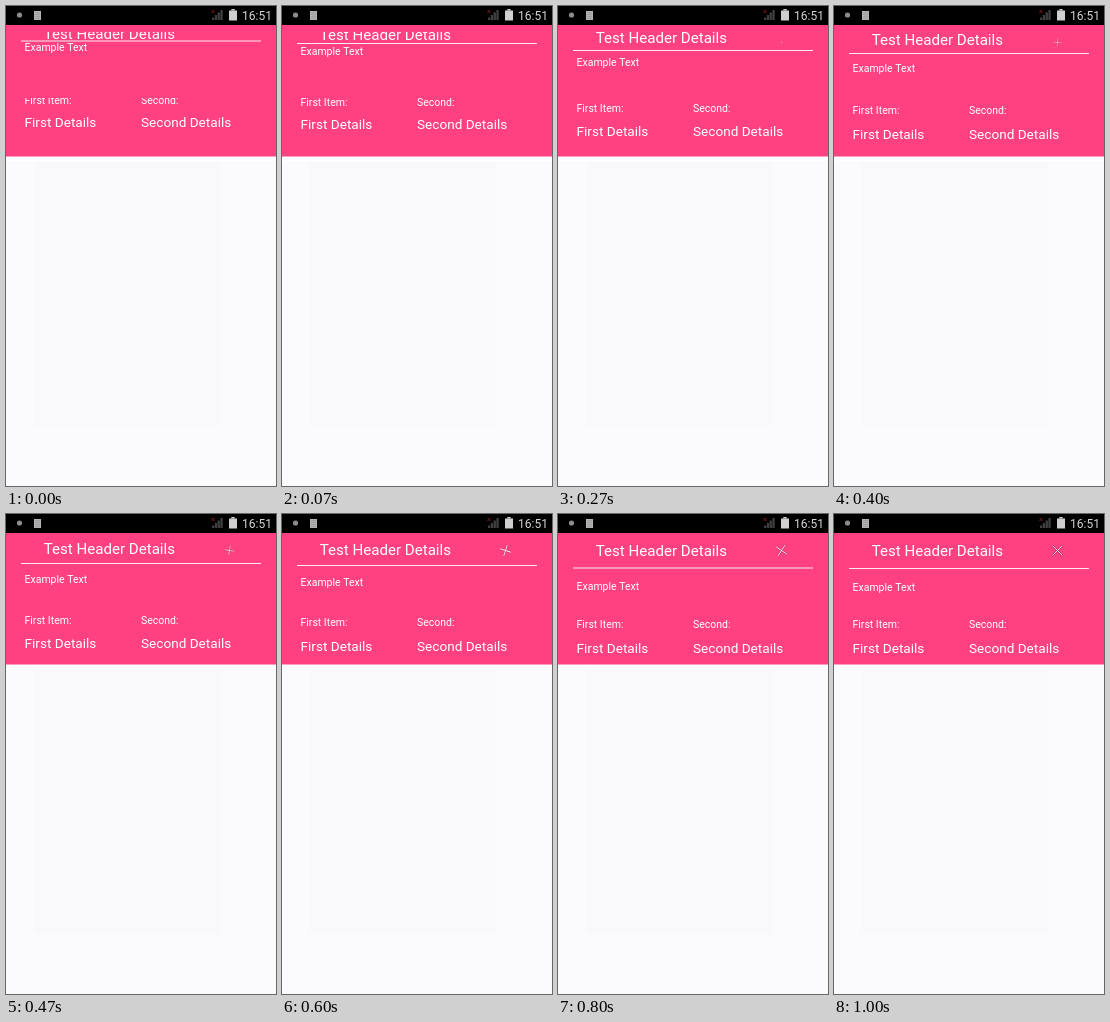
Write an HTML page with a canvas that moves like this. It is 270 px wide and 480 px high and loops after 2140 ms.

```html
<!DOCTYPE html>
<html lang="en">
<head>
<meta charset="utf-8">
<title>Header details</title>
<style>
html, body { margin: 0; width: 100%; height: 100%; overflow: hidden; background: #fff; }
canvas { display: block; width: 270px; height: 480px; }
</style>
</head>
<body>
<canvas id="stage"></canvas>
<script>
const W = 270, H = 480;
const LOOP = 2140, DURATION = 970, FPS = 15;
const PINK = '#ff4081';
const canvas = document.getElementById('stage');
const ctx = canvas.getContext('2d');
const dpr = window.devicePixelRatio || 1;
canvas.width = W * dpr;
canvas.height = H * dpr;
ctx.scale(dpr, dpr);

const clamp = v => Math.max(0, Math.min(1, v));

function rect(color, x, y, w, h) {
  ctx.fillStyle = color;
  ctx.fillRect(x, y, w, h);
}

function text(str, x, y, size, color = '#fff') {
  ctx.font = size + 'px Roboto, sans-serif';
  ctx.fillStyle = color;
  ctx.fillText(str, x, y);
}

function cross(x, y, r, color, width) {
  ctx.strokeStyle = color;
  ctx.lineWidth = width;
  ctx.beginPath();
  ctx.moveTo(x - r, y - r);
  ctx.lineTo(x + r, y + r);
  ctx.moveTo(x + r, y - r);
  ctx.lineTo(x - r, y + r);
  ctx.stroke();
}

function clipped(y, h, draw) {
  ctx.save();
  ctx.beginPath();
  ctx.rect(0, y, W, h);
  ctx.clip();
  draw();
  ctx.restore();
}

function statusBar() {
  rect('#000', 0, 0, W, 19);
  ctx.fillStyle = '#8c8c8c';
  ctx.beginPath();
  ctx.arc(13.5, 9, 2.6, 0, Math.PI * 2);
  ctx.fill();
  rect('#b4b4b4', 28, 5, 7, 9);
  for (let y = 6.5; y < 13; y += 2) rect('#8e8e8e', 29, y, 5, 0.6);
  for (let i = 0; i < 4; i++) rect('#404040', 206 + i * 2.8, 11.5 - i * 2.5, 2.3, 2.5 + i * 2.5);
  cross(207, 5.5, 1.5, '#8a1f1f', 0.9);
  rect('#d0d0d0', 225.3, 3, 3.4, 1.5);
  rect('#d0d0d0', 223, 4.5, 8, 10);
  text('16:51', 236, 13.7, 12, '#d6d6d6');
}

function page() {
  rect('#fbfbfd', 0, 150, W, 330);
  rect('#f9f9fc', 28, 156, 187, 264);
  rect('#fff', 0, 150, W, 5);
}

function closeIcon(t, size) {
  // Turns from a plus into a cross
  const spin = clamp((t - 0.35) / 0.65);
  ctx.save();
  ctx.globalAlpha = 0.9 * clamp((t - 0.22) / 0.4);
  ctx.translate(223.5, 36.5);
  ctx.rotate((spin - 1) * Math.PI / 4);
  cross(0, 0, 4.6 * size, 'rgba(80, 20, 45, 0.35)', 2);
  cross(0, 0, 4.6 * size, '#fff', 0.9);
  ctx.restore();
}

function header(t) {
  // Share of the slide still to go, decelerating
  const left = (1 - t) ** 2;
  const slide = (end, distance) => end - distance * left;
  const lineY = Math.round(slide(54, 19.6) * 2) / 2;

  rect(PINK, 0, 19, W, 131.5);
  clipped(26, lineY - 26, () => text('Test Header Details', 37.7, slide(42, 9.3), 15.1));
  closeIcon(t, 1 - left);
  rect('#ffeaf1', 15, lineY, 240, 1);
  clipped(lineY + 1, 149 - lineY, () => text('Example Text', 18.5, slide(77.2, 32.5), 10.5));

  clipped(92, 58, () => {
    const labelY = slide(114, 16.2), detailY = slide(139.2, 18.4);
    [[18.5, 'First Item:', 'First Details'], [135, 'Second:', 'Second Details']]
      .forEach(([x, label, detail]) => {
        text(label, x, labelY, 10.5);
        text(detail, x, detailY, 13.6);
      });
  });
}

// Fifteen pictures a second, with times rounded to 10 ms
const shownAt = n => Math.round(n * 100 / FPS) * 10;

function progress(ms) {
  let n = Math.floor(ms * FPS / 1000);
  if (ms >= shownAt(n + 1)) n++;
  return clamp(shownAt(n) / DURATION);
}

const start = performance.now();
function frame() {
  const ms = (performance.now() - start) % LOOP;
  page();
  header(progress(ms));
  statusBar();
  requestAnimationFrame(frame);
}
frame();
</script>
</body>
</html>
```
